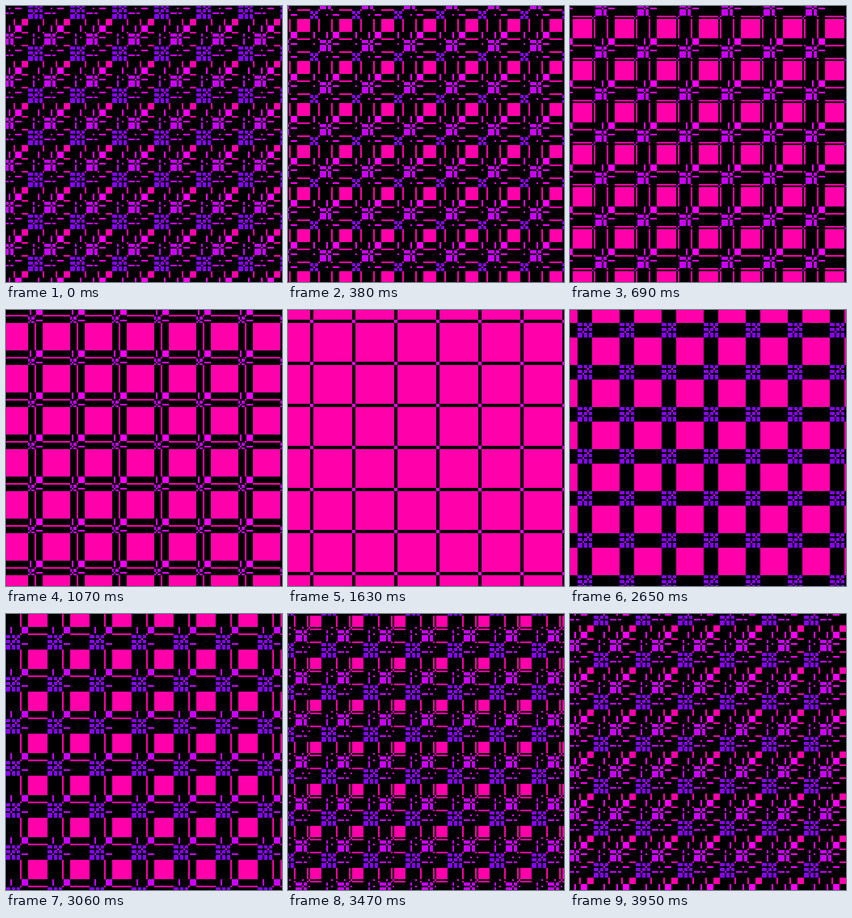
Write an HTML page with a canvas that moves like this. It is 512 by 512 pixels and loops after 4.03 s.

```html
<!DOCTYPE html>
<html lang="en">
<head>
<meta charset="utf-8">
<title>Weave</title>
<style>
  html, body { margin: 0; width: 100%; height: 100%; overflow: hidden; background: #000; }
  canvas { display: block; }
</style>
</head>
<body>
<canvas width="512" height="512"></canvas>
<script>
const ctx = document.querySelector('canvas').getContext('2d');
const SIZE = 512, CELL = 3, REPEAT = 26;
const ORIGIN_X = 41, ORIGIN_Y = 21;
const COLORS = { p: '#ff00aa', m: '#ff00ff', u: '#cc00ff', v: '#8800ff' };

// Thread order, followed by one plain repeat; it scrolls one thread per step.
const THREADS = 'vvvuvvmvvpuuuumuupmmmmpppp' + 'p'.repeat(REPEAT);

// How long each step is held, in ms.
const times = (n, ...beat) => Array(n).fill(beat).flat();
const HOLDS = [
  150, ...times(5, 80, 100, 50), ...times(2, 100, 100, 30), ...times(5, 60),
  ...times(2, 80, 50, 100), 80, 50, 80, 100, 50, 80, 100, 80,
  80, 100, 50, 100, 100, 30, 120, 80, 100, 50, 80
];
const LOOP = HOLDS.reduce((sum, hold) => sum + hold, 0);

const mod = (a, n) => ((a % n) + n) % n;

function stepAt(ms) {
  let step = 0;
  while (ms >= HOLDS[step]) ms -= HOLDS[step++];
  return step;
}

// A cell is coloured where warp and weft carry the same thread.
function draw(step) {
  const thread = i => THREADS[(step + mod(i, REPEAT)) % THREADS.length];
  ctx.fillStyle = '#000';
  ctx.fillRect(0, 0, SIZE, SIZE);
  for (let i = -14; ORIGIN_X + i * CELL < SIZE; i++) {
    const warp = thread(i);
    ctx.fillStyle = COLORS[warp];
    for (let j = 7; ORIGIN_Y - j * CELL < SIZE; j--) {
      if (thread(j) === warp) {
        ctx.fillRect(ORIGIN_X + i * CELL, ORIGIN_Y - j * CELL, CELL, CELL);
      }
    }
  }
}

let shown = -1;
const start = performance.now();

function tick() {
  const step = stepAt((performance.now() - start) % LOOP);
  if (step !== shown) draw(shown = step);
  requestAnimationFrame(tick);
}
tick();
</script>
</body>
</html>
```
